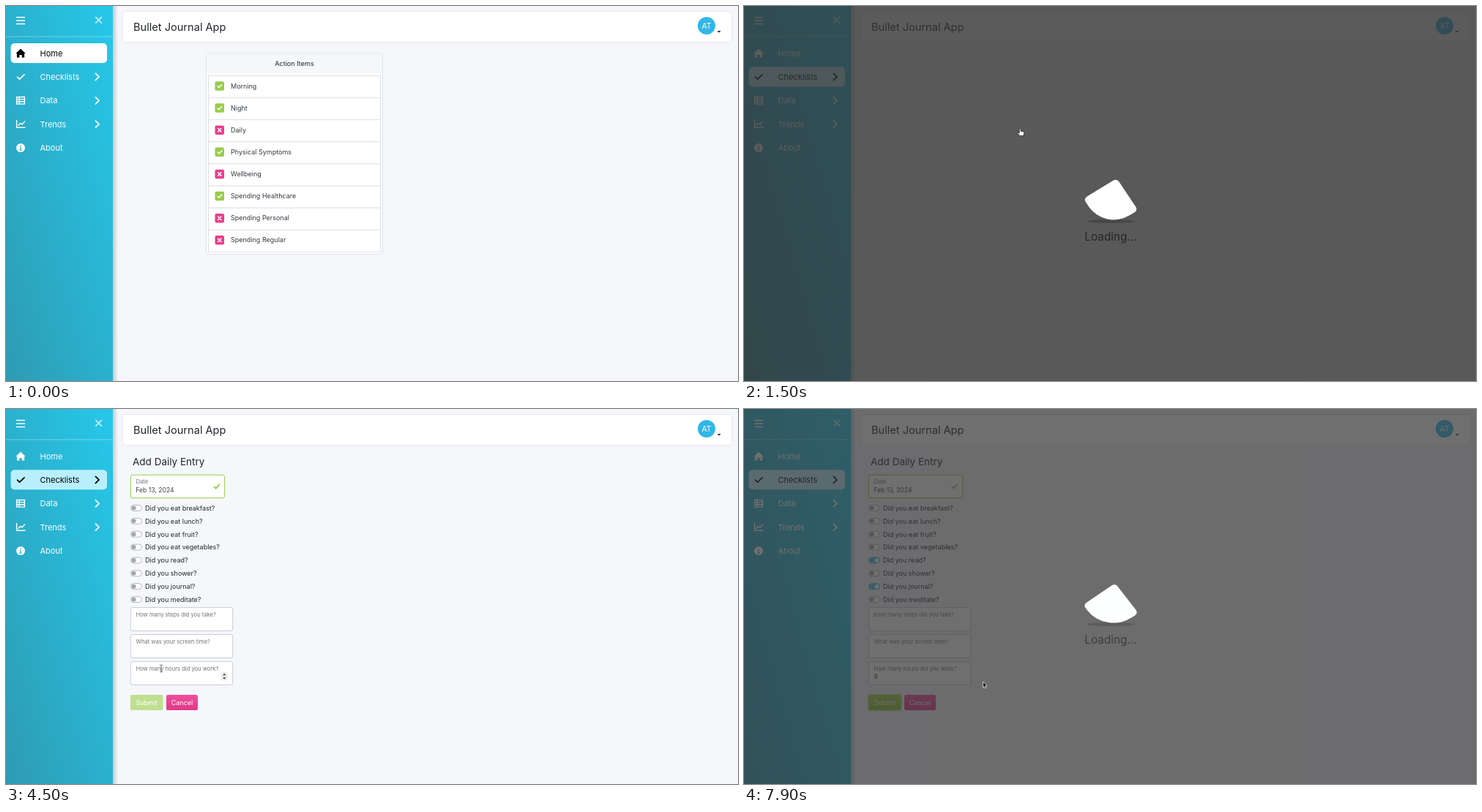
These frames come from a looping animation (1000 px wide and 513 px high, 8000 ms). An HTML page:

```html
<!DOCTYPE html>
<html lang="en">
<head>
<meta charset="utf-8">
<title>Journal app</title>
<style>
html, body { margin: 0; width: 100%; height: 100%; overflow: hidden; background: #f5f7fb; }
svg, #load, #load * { position: absolute; }
svg { left: 0; top: 0; width: 1000px; height: 513px; }
text, #load { font-family: Inter, "Open Sans", sans-serif; }
#load { left: 0; top: 0; width: 1000px; height: 513px; background: rgba(51,51,51,.8); }
#jelly { left: 473.8px; top: 225.4px; width: 54px; height: 54px; background: #fff; border-radius: 10%; }
#shade { left: 473.8px; top: 292.4px; width: 54px; height: 5.4px; background: #000; opacity: .2; border-radius: 50%; }
#label { left: 0; width: 1002px; top: 306px; text-align: center; font-size: 15.3px; line-height: 19px; color: #262626; }
</style>
</head>
<body>
<svg id="page" viewBox="0 0 1000 513"></svg>
<div id="load"><div id="shade"></div><div id="jelly"></div><div id="label">Loading...</div></div>
<svg id="pointer" viewBox="0 0 1000 513">
  <g id="hand"><path transform="translate(-.8 -.5) scale(.95)" d="M0 1.2q0-1.2 1-1.2t1 1.2V4l3.6.8q1.3.4 1.2 1.7L6 10.5H.8L-2.4 7q-.6-1.5.8-1.3L0 6.8z" fill="#fff" stroke="#222" stroke-width=".8"/></g>
  <g id="arrow"><path d="M0 0v8l1.8-1.6L3 9.2l1.4-.6-1.2-2.7h2.5z" fill="#111" stroke="#fff" stroke-width=".7"/></g>
  <g id="beam"><path d="M-2-5q2 0 2 1.2Q0-5 2-5M0-4v8M-2 5Q0 5 0 3.8 0 5 2 5" fill="none" stroke="#555" stroke-width=".8"/></g>
</svg>
<script>
const LOOP = 8000, GREEN = '#99cc4b', PINK = '#e83e8c', BLUE = '#4cc0ee', INK = '#212529';
const $ = id => document.getElementById(id);
const rect = (x, y, w, h, fill, extra = '') =>
  `<rect x="${x}" y="${y}" width="${w}" height="${h}" fill="${fill}" ${extra}/>`;
const text = (x, y, s, size, fill = INK, extra = '') =>
  `<text x="${x}" y="${y}" font-size="${size}" fill="${fill}" ${extra}>${s}</text>`;
const line = (d, color, width, extra = '') =>
  `<path d="${d}" fill="none" stroke="${color}" stroke-width="${width}" ${extra}/>`;
const glow = (id, x, y, w, h, color) =>
  rect(x, y, w, h, 'none', `rx="4" stroke="${color}" stroke-opacity=".35" stroke-width="2.5" id="${id}"`);
const group = (id, body) => `<g id="${id}">${body}</g>`;
const mid = 'text-anchor="middle"', round = 'stroke-linecap="round" stroke-linejoin="round"';

function sidebar() {
  const icons = [
    '<path d="M13.3 65 20 58.6 26.7 65h-1.6v5.6h-3.4v-3.6h-3.4v3.6h-3.4V65z" fill="currentColor"/>',
    line('M15.5 97.2l3 3 6.5-6.3', 'currentColor', 1.8, round),
    line('M14.6 124.5h10.8v9.6H14.6zM14.6 127.6h10.8M14.6 130.8h10.8M18.2 124.5v9.6', 'currentColor', 1.4),
    line('M14.6 156.5v9.8h11.4M17 163.2l2.8-3 2 1.8 3.7-3.9', 'currentColor', 1.4, round),
    '<circle cx="20" cy="194" r="6" fill="currentColor"/>' +
      line('M20 193v4M18.8 193.3H20M18.6 197h2.8M20 190.2v1.5', '#2bb0cf', 1.3)
  ];
  const items = ['Home', 'Checklists', 'Data', 'Trends', 'About'].map((name, i) => {
    const y = 64.6 + 32.35 * i;
    const more = i > 0 && i < 4 ? line(`M122.4 ${y - 4.5}l4.6 4.5-4.6 4.5`, 'currentColor', 1.8, round) : '';
    return group('nav' + i, icons[i] + text(46.5, y + 4.1, name, 11, 'currentColor') + more);
  });
  return rect(146, 0, 7, 513, 'url(#edge)') + rect(0, 0, 146, 513, 'url(#sea)') +
    rect(0, 41, 146, 1.6, '#fff', 'opacity=".22"') +
    line('M14 15.5h12M14 20h12M14 24.5h12', '#fff', 1.7) +
    line('M122.3 15l8.6 8.6M130.9 15l-8.6 8.6', '#fff', 2, 'opacity=".65"') +
    rect(6.5, 51, 131.5, 27, '#fff', 'rx="5" id="homeBg"') +
    rect(6.5, 83.3, 131.5, 27, '#b9effc', 'rx="5" id="listBg"') + items.join('');
}

function header() {
  return rect(160, 8, 831, 41, '#fff', 'rx="5" filter="url(#soft)"') +
    text(174, 34, 'Bullet Journal App', 14.6) +
    '<circle cx="957" cy="27" r="12" fill="#31b7e9"/>' + text(957, 31, 'AT', 10.5, '#fff', mid) +
    '<path d="M971.6 34h5l-2.5 2.6z" fill="#222"/>';
}

function actions() {
  const names = ['Morning', 'Night', 'Daily', 'Physical Symptoms', 'Wellbeing',
    'Spending Healthcare', 'Spending Personal', 'Spending Regular'];
  const done = [1, 1, 0, 1, 0, 1, 0, 0];
  return rect(273.5, 65, 241, 274.5, '#fff', 'rx="3" stroke="#dfe2e8"') +
    rect(274, 65.5, 240, 26.5, '#f5f7fa') + text(394, 81.7, 'Action Items', 9.1, INK, mid) +
    names.map((name, i) => {
      const y = 109.4 + 30.13 * i;
      return rect(276.5, y - 14, 235, 30.1, '#fff', 'stroke="#dee2e6"') +
        rect(285.5, y - 6.2, 12.5, 12.5, done[i] ? GREEN : PINK, 'rx="2"') +
        line(done[i] ? `M289 ${y + .2}l2 2 3.8-4` : `M289.6 ${y - 2.1}l4.3 4.3M293.9 ${y - 2.1}l-4.3 4.3`, '#fff', 1.5, round) +
        text(307, y + 3.1, name, 9, '#343a40');
    }).join('');
}

function field(id, y, label) {
  return rect(170.3, y, 139.4, 32, '#fff', `rx="2.5" stroke="#c8cdd6" id="${id}"`) +
    text(177.5, y + 12.7, label, 7.6, '#6f757c');
}

function button(id, x, w, label, fill) {
  return group(id, rect(x, 391, w, 21, fill, 'rx="2"') + text(x + w / 2, 404.8, label, 9, '#fff', mid));
}

function form() {
  const habits = ['eat breakfast', 'eat lunch', 'eat fruit', 'eat vegetables', 'read', 'shower', 'journal', 'meditate'];
  return text(173, 77.3, 'Add Daily Entry', 13.5) +
    glow('dateGlow', 169, 88.8, 131, 34.4, GREEN) +
    rect(170.4, 90.2, 128.2, 31.5, '#fff', `rx="2.5" stroke="${GREEN}"`) +
    text(177.5, 102.3, 'Date', 7.6, '#6f757c') + text(177.3, 113.8, 'Feb 13, 2024', 8.6, '#3c4248') +
    line('M284.2 106l2.5 2.6 5.2-5.8', GREEN, 2, 'id="tick"') +
    habits.map((habit, i) => {
      const y = 135.5 + 17.86 * i;
      return rect(170.5, y - 4, 15, 8, '#fff', `rx="4" stroke="#b4b7bb" id="pill${i}"`) +
        `<circle id="knob${i}" cy="${y}" r="3"/>` + text(190, y + 3.3, `Did you ${habit}?`, 9);
    }).join('') +
    glow('hoursGlow', 169, 344.2, 142, 34.4, BLUE) +
    field('steps', 271.5, 'How many steps did you take?') +
    field('screen', 308.5, 'What was your screen time?') +
    field('hours', 345.4, 'How many hours did you work?') +
    group('stepper', rect(294, 360, 8.5, 11.5, '#ececec', 'rx="1"') +
      '<path d="M296 364.3h4.5l-2.2-2.6zM296 367.2h4.5l-2.2 2.6z" fill="#444"/>') +
    group('typed', text(177.5, 369, '8', 8.6, '#3c4248')) +
    glow('submitGlow', 169.4, 390.4, 45.8, 22.2, '#8fc93a') +
    button('off', 170, 44.6, 'Submit', '#bfe090') + button('on', 170, 44.6, 'Submit', 'url(#lime)') +
    button('cancel', 219, 43, 'Cancel', 'url(#rose)');
}

function calendar() {
  const col = i => 170 + 18.1 * i;
  let out = rect(148, 124, 171, 200, '#fff', 'filter="url(#drop)"') + rect(156, 131, 155, 28, '#5cb85c', 'rx="2"') +
    rect(156.5, 159, 154, 157, 'none', 'stroke="#e9edf0"') + text(233.5, 148.3, 'February 2024', 8.6, '#fff', mid) +
    text(167, 149, '‹', 12, '#fff', mid) + text(300, 149, '›', 12, '#fff', mid);
  ['Sun', 'Mon', 'Tue', 'Wed', 'Thu', 'Fri', 'Sat'].forEach((d, i) => out += text(col(i + 1), 174, d, 6.6, '#9aaec1', mid));
  for (let i = 0; i < 42; i++) {
    const day = new Date(2024, 0, 28 + i), x = col(i % 7 + 1), y = 194 + 21.6 * Math.floor(i / 7);
    const inMonth = day.getMonth() === 1, picked = inMonth && day.getDate() === 13;
    if (i % 7 === 0) out += text(col(0), y + 2.5, 5 + i / 7, 6.6, '#5cb85c', mid);
    if (picked) out += `<circle cx="${x}" cy="${y}" r="8.5" fill="#5cb85c"/>`;
    out += text(x, y + 2.7, day.getDate(), 7.4, picked ? '#fff' : inMonth ? '#54708b' : '#ccc', mid);
  }
  return out;
}

const fade = (id, from, to, dir) => `<linearGradient id="${id}" ${dir}>
  <stop stop-color="${from}"/><stop offset="1" stop-color="${to}"/></linearGradient>`;
const shadow = (id, blur, alpha) => `<filter id="${id}" x="-10%" y="-30%" width="120%" height="160%">
  <feDropShadow dx="0" dy="0" stdDeviation="${blur}" flood-opacity="${alpha}"/></filter>`;
const down = 'x1="0" y1="0" x2="0" y2="1"';

$('page').innerHTML = '<defs>' + fade('sea', '#2e9bb3', '#26c8ea', 'x1="0" y1="1" x2="1" y2="0"') +
  fade('edge', 'rgba(60,60,70,.25)', 'rgba(60,60,70,0)', '') +
  fade('lime', '#9cd147', '#88c32f', down) + fade('rose', '#f0509a', '#e3378a', down) +
  shadow('soft', 2.5, .07) + shadow('drop', 2.5, .33) + '</defs>' + rect(0, 0, 1000, 513, '#f5f7fb') +
  sidebar() + header() + group('actions', actions()) + group('form', form()) + group('calendar', calendar());

// time, x, y, kind of pointer from that time on
const moves = [
  [0, 287, 256, ''], [300, 287, 256, 'hand'], [400, 397, 194, 'hand'], [600, 397, 194, 'hand'],
  [900, 377, 168, 'hand'], [1800, 377, 168, 'hand'], [1900, 325, 146, 'arrow'], [2000, 268, 122, 'arrow'],
  [2200, 252, 112, 'beam'], [2400, 236, 106, 'beam'], [2800, 236, 106, 'beam'], [3100, 232, 150, 'hand'],
  [3700, 218, 226, 'hand'], [4000, 218, 226, 'hand'], [4200, 217, 301, 'beam'], [4300, 217, 301, 'beam'],
  [4500, 212, 355, 'beam'], [4900, 250, 368, 'beam'], [5300, 250, 368, ''], [5700, 250, 360, 'beam'],
  [5900, 230, 310, 'hand'], [6300, 178, 204, 'hand'], [6500, 178, 204, 'hand'], [6800, 178, 240, 'hand'],
  [7000, 178, 240, 'hand'], [7500, 183, 407, 'hand'], [7600, 183, 407, 'hand'], [7700, 231, 396, 'arrow'],
  [7900, 326.5, 373, 'arrow'], [8000, 326.5, 373, 'arrow']
];

const clamp = v => Math.max(0, Math.min(1, v));
const show = (id, on) => $(id).style.display = on ? '' : 'none';

function movePointer(t) {
  const i = moves.findLastIndex(m => m[0] <= t), a = moves[i], b = moves[i + 1];
  const k = (t - a[0]) / (b[0] - a[0]);
  for (const kind of ['hand', 'arrow', 'beam']) show(kind, kind === a[3]);
  if (a[3]) $(a[3]).setAttribute('transform', `translate(${a[1] + k * (b[1] - a[1])} ${a[2] + k * (b[2] - a[2])})`);
}

function spin(t) {
  const first = t < 4000;
  const alpha = first ? Math.min(clamp((t - 1200) / 300), clamp((2000 - t) / 200)) : clamp((t - 7635) / 300);
  $('load').style.opacity = alpha;
  const p = ((t - (first ? 1500 : 7900)) / 600 + (first ? .64 : .6) + 20) % 1;
  const wave = 1 - Math.abs(2 * p - 1), squash = 1 - .1 * clamp(2 * wave - 1);
  const corner = p < .5 ? 10 + 90 * clamp((p - .17) / .33) : 100 - 180 * (p - .5);
  $('jelly').style.transform = `translateY(${50 * wave}%) scale(1,${squash}) rotate(${90 * p}deg)`;
  $('jelly').style.borderBottomRightRadius = corner + '%';
  $('shade').style.transform = `scale(${1 + .25 * wave},1)`;
}

function toggle(i, on) {
  $('pill' + i).setAttribute('fill', on ? BLUE : '#fff');
  $('pill' + i).setAttribute('stroke', on ? BLUE : '#b4b7bb');
  $('knob' + i).setAttribute('fill', on ? '#fff' : '#a3a6aa');
  $('knob' + i).setAttribute('cx', on ? 181.5 : 174.5);
}

function draw(t) {
  const left = t >= 1200, nav = clamp((t - 1190) / 300), focus = t >= 4700 && t < 6200;
  for (let i = 0; i < 5; i++) $('nav' + i).style.color = i === +left ? '#000' : '#fff';
  $('homeBg').style.opacity = 1 - nav;
  $('listBg').style.opacity = nav;
  show('actions', t < 1100);
  show('form', t >= 1700);
  show('calendar', t >= 2500 && t < 3700);
  show('dateGlow', t >= 2500 && t < 3800);
  $('tick').setAttribute('stroke-width', t < 5700 ? 2 : 1.5);
  show('hoursGlow', focus);
  $('hours').setAttribute('stroke', focus ? BLUE : '#c8cdd6');
  show('stepper', t >= 4400 && t < 6200);
  show('typed', t >= 5300);
  show('on', t >= 5300);
  show('off', t < 5300);
  show('submitGlow', t >= 7700);
  for (let i = 0; i < 8; i++) toggle(i, i === 4 && t >= 6300 || i === 6 && t >= 6800);
  spin(t);
  movePointer(t);
}

function tick() {
  draw(Math.floor(performance.now() % LOOP / 100) * 100);
  requestAnimationFrame(tick);
}
tick();
</script>
</body>
</html>
```
